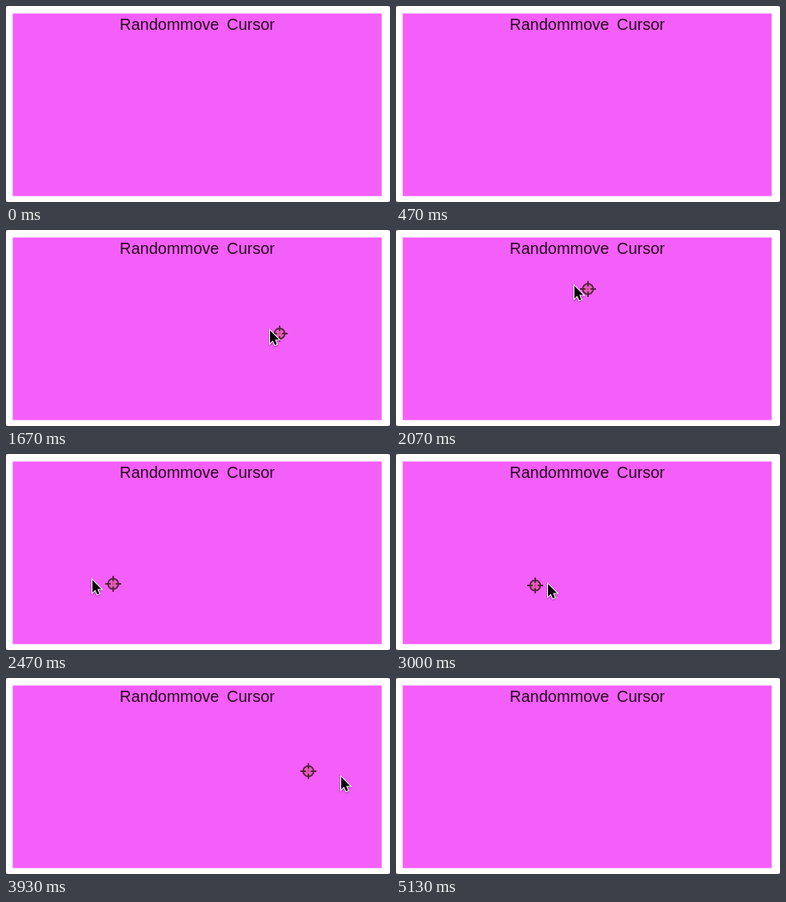
Animation, 480 px wide and 246 px high, one loop 5.19 s. Source, as an HTML page:

```html
<!DOCTYPE html>
<html lang="en">
<head>
<meta charset="utf-8">
<title>Randommove Cursor</title>
<style>
  html, body { margin: 0; width: 100%; height: 100%; overflow: hidden; background: #777; }
  svg { display: block; width: 480px; height: 246px; }
  text { font: 20px "Liberation Sans", Arial, sans-serif; word-spacing: 4px; text-anchor: middle; fill: #24051c; }
  #sight { fill: none; stroke: #55223f; stroke-width: 1.9; }
  #sight circle { fill: #e45cb8; }
  #arrow { filter: drop-shadow(0 1px 1px rgba(0, 0, 0, .4)); }
</style>
</head>
<body>
<svg viewBox="0 0 480 246">
  <rect width="480" height="246" rx="3" fill="#fff"/>
  <rect x="8.4" y="9.4" width="461.2" height="229.2" fill="#f55ff9"/>
  <text x="239" y="30">Randommove Cursor</text>
  <g id="sight" visibility="hidden">
    <circle r="6.6"/>
    <path d="M0-10V-3.2M0 10V3.2M-10 0H-3.2M10 0H3.2"/>
    <path d="M-1.5 0H1.5M0-1.5V1.5" stroke="#c8406a" stroke-width="1"/>
  </g>
  <path id="arrow" visibility="hidden" stroke="#fff" stroke-width="2" paint-order="stroke"
    d="M1 1V17L4.6 13.6L7.1 19.3L9.6 18.2L7.2 12.6H12.2Z"/>
</svg>
<script>
  const LOOP = 5190, STEP = 1000 / 15;
  const FIRST = 14, LAST = 60;

  // Key points of the mouse route: [step, x, y]
  const route = [
    [14, 500, 140], [16, 457, 141], [17, 430, 136], [22, 440, 11],
    [24, 342, 125], [25, 329, 124], [31, 222, 68], [36, 134, 158],
    [37, 107, 156], [40, 75, 79], [44, 174, 160], [45, 189, 161],
    [49, 357, 46], [53, 182, 144], [58, 378, 112], [59, 418, 122],
    [61, 505, 140]
  ];

  const slope = (i, axis) => {
    const a = route[Math.max(i - 1, 0)];
    const b = route[Math.min(i + 1, route.length - 1)];
    return (b[axis] - a[axis]) / (b[0] - a[0]);
  };

  // Cubic Hermite curve through the route
  function along(step, axis) {
    let i = 0;
    while (i < route.length - 2 && route[i + 1][0] <= step) i++;
    const a = route[i], b = route[i + 1];
    const h = b[0] - a[0], u = (step - a[0]) / h, v = 1 - u;
    return v * v * (1 + 2 * u) * a[axis] + u * u * (3 - 2 * u) * b[axis]
      + h * u * v * (v * slope(i, axis) - u * slope(i + 1, axis));
  }

  const arrow = document.getElementById("arrow");
  const sight = document.getElementById("sight");

  function place(el, step, dy) {
    const shown = step >= FIRST && step <= LAST;
    el.setAttribute("visibility", shown ? "visible" : "hidden");
    if (!shown) return;
    const x = Math.round(along(step, 1)), y = Math.round(along(step, 2)) + dy;
    el.setAttribute("transform", `translate(${x} ${y})`);
  }

  function draw(now) {
    const step = Math.floor((now % LOOP + 4) / STEP);
    place(arrow, step, 1);
    place(sight, step - 1, 5); // trails the mouse by one step
    requestAnimationFrame(draw);
  }
  requestAnimationFrame(draw);
</script>
</body>
</html>
```
